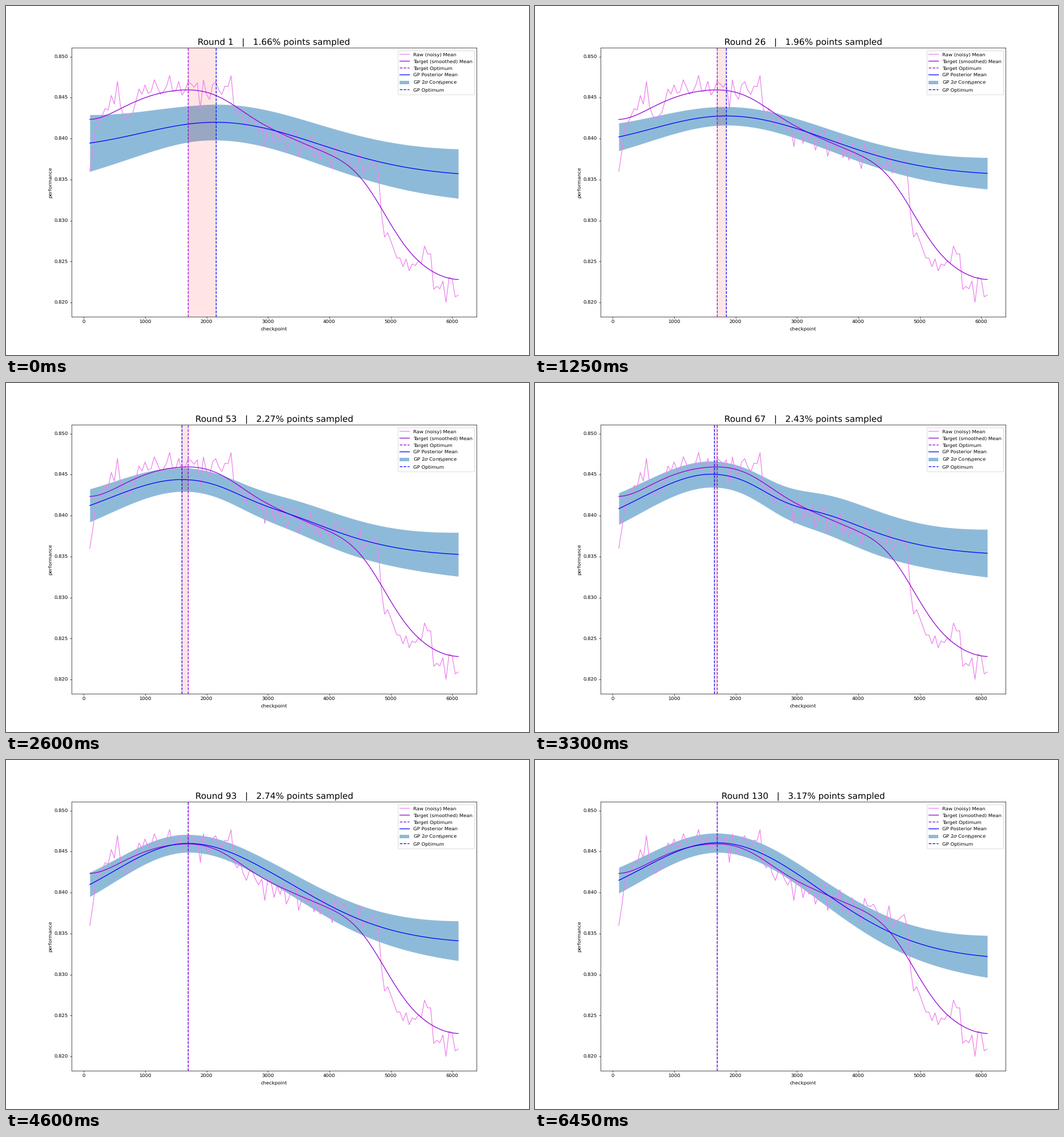
Recreate the animation shown at these times as a matplotlib script. Size 917 by 611 pixels, loop 6500 ms.

```python
import numpy as np
import matplotlib.pyplot as plt
from matplotlib.animation import FuncAnimation

W, H, DPI = 917, 611, 917 / 15
ROUNDS, INTERVAL = 130, 50
BASE, UNIT = 0.82, 1e-4          # curve values are stored in UNITs above BASE
POOL, WARMUP = 8591, 142         # candidate points, points sampled beforehand
TARGET_BEST = 1700
LEFT, RIGHT, WAIST = 100, 6100, 1900

plt.rcParams["font.family"] = "DejaVu Sans"
plt.rcParams["text.hinting"] = "none"

x = np.arange(LEFT, RIGHT + 1, 50)

# Corners of the underlying trend: checkpoint, value
TREND = [(100, 160), (200, 213), (450, 254), (700, 226), (900, 256),
         (1600, 261), (2400, 264), (2450, 230), (3000, 211), (3400, 202),
         (3900, 181), (4800, 167), (4900, 80), (5200, 46), (5650, 46),
         (5750, 23), (6100, 18)]

# round, optimum, mean at left / peak / right, 2-sigma at left / waist / right
POSES = np.array([
    (1, 2150, 194.5, 219.9, 157.2, 34.6, 21.7, 30.1),
    (26, 1850, 202.0, 227.6, 157.6, 16.9, 11.2, 19.2),
    (39, 1600, 216.1, 237.3, 151.3, 21.0, 12.6, 24.4),
    (67, 1650, 208.4, 250.9, 154.1, 19.2, 15.6, 29.0),
    (93, 1700, 209.8, 260.0, 141.2, 14.8, 10.7, 24.2),
    (109, 1650, 219.9, 260.0, 127.6, 16.7, 13.0, 25.9),
    (130, 1700, 215.0, 260.7, 122.1, 15.7, 11.6, 25.6),
])


def to_perf(v):
    return BASE + UNIT * np.asarray(v)


def bell(d, width):
    return np.exp(-0.5 * (d / width) ** 2)


def gaussian_smooth(v, sigma=8):
    r = 4 * sigma
    k = bell(np.arange(-r, r + 1), sigma)
    return np.convolve(np.pad(v, r, mode="symmetric"), k / k.sum(), "valid")


def flank(peak_x, end_x, width):
    """Bell slope: 1 at peak_x, exactly 0 at end_x."""
    floor = bell(end_x - peak_x, width)
    return (bell(x - peak_x, width) - floor) / (1 - floor)


def posterior(rnd):
    best, start, peak, end, left, waist, right = (
        np.interp(rnd, POSES[:, 0], col) for col in POSES.T[1:])
    mean = np.where(x < best,
                    start + (peak - start) * flank(best, LEFT, 1200),
                    end + (peak - end) * flank(best, RIGHT, 1660))
    far = np.where(x < WAIST, (WAIST - x) / (WAIST - LEFT),
                   (x - WAIST) / (RIGHT - WAIST))
    half = waist + (np.where(x < WAIST, left, right) - waist) * far ** 1.6

    # halfway through, the fit sags and grows unsure behind the peak
    doubt = bell(rnd - 67, 12)
    mean = mean - 13 * doubt * bell(x - 2800, 450)
    half = half + 6.5 * doubt * bell(x - 3900, 800)
    return mean, half, 50 * round(best / 50)


trend = np.interp(x, *zip(*TREND))
noise = np.random.default_rng(3).normal(0, 9, x.size)
raw = trend + noise * np.minimum(1, (x - LEFT) / 500)

fig, ax = plt.subplots(figsize=((W + 0.01) / DPI, (H + 0.01) / DPI), dpi=DPI)

mean, half, best = posterior(1)
ax.plot(x, to_perf(raw), color="violet", label="Raw (noisy) Mean")
ax.plot(x, to_perf(gaussian_smooth(trend)), color="darkviolet",
        label="Target (smoothed) Mean")
ax.axvline(TARGET_BEST, color="darkviolet", ls="--", zorder=2.1,
           label="Target Optimum")
mean_line, = ax.plot(x, to_perf(mean), color="blue",
                     label="GP Posterior Mean")
band = ax.fill_between(x, to_perf(mean - half), to_perf(mean + half),
                       color="tab:blue", alpha=0.5, lw=0,
                       label=r"GP 2$\sigma$ Confidence")
best_line = ax.axvline(best, color="blue", ls="--", label="GP Optimum")
gap = ax.axvspan(TARGET_BEST, best, facecolor="red", alpha=0.1, lw=0)

ax.set_xlim(-200, 6400)
ax.set_ylim(0.818294, 0.851058)
ax.set_xlabel("checkpoint")
ax.set_ylabel("performance")
ax.legend(loc="upper right")
title = ax.set_title("", fontsize=18)


def update(i):
    rnd = i + 1
    mean, half, best = posterior(rnd)
    mean_line.set_ydata(to_perf(mean))
    low = np.column_stack([x, to_perf(mean - half)])
    high = np.column_stack([x, to_perf(mean + half)])
    band.set_verts([np.vstack([low, high[::-1]])])
    best_line.set_xdata([best, best])
    gap.set_x(min(best, TARGET_BEST))
    gap.set_width(abs(best - TARGET_BEST))
    share = 100 * (WARMUP + rnd) / POOL
    title.set_text(f"Round {rnd}   |   {share:.2f}% points sampled")
    return mean_line, band, best_line, gap, title


anim = FuncAnimation(fig, update, frames=ROUNDS, interval=INTERVAL,
                     repeat=True, repeat_delay=0, blit=False)
plt.show()
```
